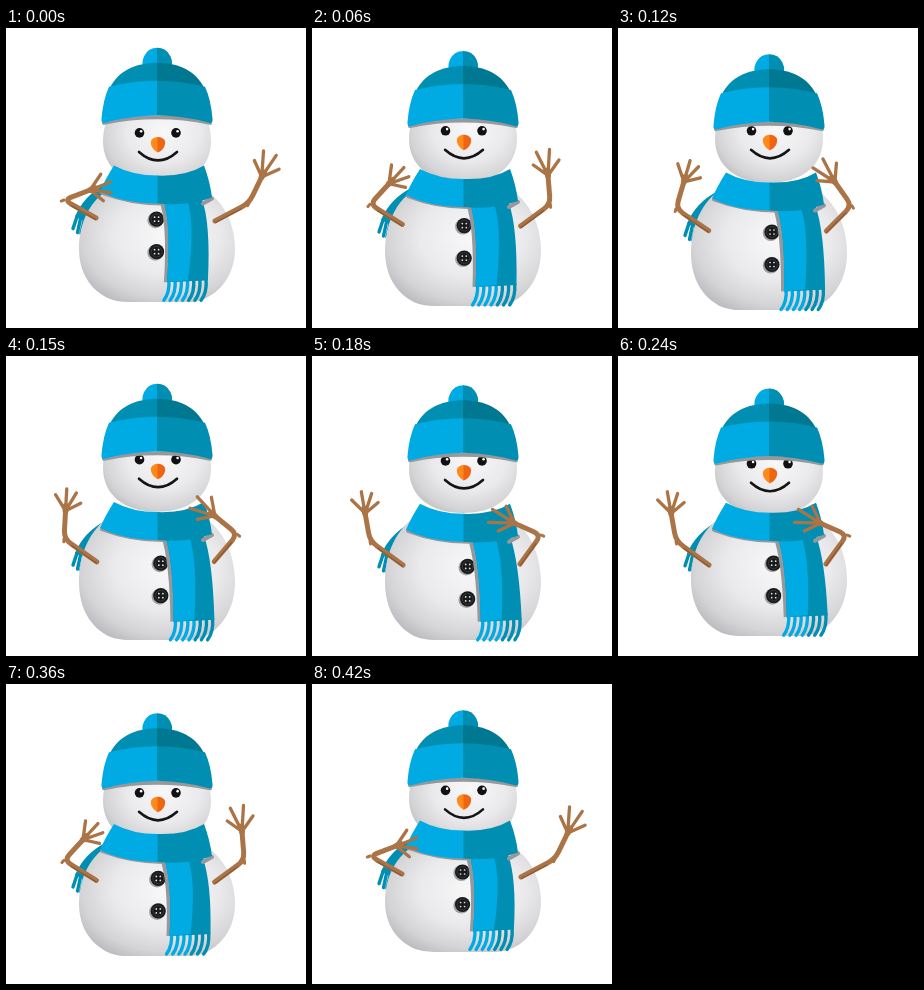
An HTML page for the animation above (0.45 s loop, 300x300 px).

```html
<!DOCTYPE html>
<html lang="en">
<head>
<meta charset="utf-8">
<title>Waving snowman</title>
<style>
html, body { margin: 0; width: 100%; height: 100%; overflow: hidden; background: #fff; }
svg { display: block; width: 100vw; height: 100vh; }
.light { fill: #00abe4; }
.mid { fill: #008fb2; }
.dark { fill: #007892; }
.twig { fill: none; stroke: #ab7447; stroke-linecap: round; stroke-linejoin: round; }
.grain { fill: none; stroke: #8a5935; stroke-width: 1.2; }
.shade { fill: none; stroke: #96989b; stroke-width: 4; stroke-linecap: round; }
.fringe { fill: none; stroke-width: 3.4; stroke-linecap: round; }
</style>
</head>
<body>
<svg viewBox="0 0 300 300">
  <defs>
    <radialGradient id="snow" cx=".56" cy=".42" r=".68">
      <stop offset="0" stop-color="#f8f8f9"/>
      <stop offset=".5" stop-color="#eaeaec"/>
      <stop offset=".8" stop-color="#d4d4d7"/>
      <stop offset="1" stop-color="#b8b8bc"/>
    </radialGradient>
    <g id="button">
      <circle cx="-1.2" cy="1" r="8" fill="#a2a2a5"/>
      <circle r="7.6" fill="#17191b"/>
      <circle r="5.4" fill="none" stroke="#3d3f42" stroke-width=".8"/>
      <path d="M-2-2h.1M2-2h.1M-2 2h.1M2 2h.1" stroke="#ddd" stroke-width="1.7" stroke-linecap="round"/>
    </g>
    <g id="eye">
      <circle r="4.8" fill="#111"/>
      <circle cx="1.6" cy="-1.7" r="1.3" fill="#fff"/>
    </g>
  </defs>

  <g id="back">
    <path class="mid" d="M99 163Q78 174 69 195L79 200Q86 186 102 178Z"/>
    <path class="fringe" stroke="#008fb2" d="M71 195l-4 12M74.500 197l-3 14M78 199l-3 13"/>
  </g>
  <path id="body" fill="url(#snow)" d="M105 160C84 172 73 196 73 223C73 247 84 266 104 275Q112 278 122 278H182Q192 278 200 274C218 265 229 246 229 223C229 196 217 172 196 160Z"/>
  <g id="buttons">
    <use href="#button"/>
    <use href="#button" y="32.5"/>
  </g>

  <g id="head">
    <path fill="url(#snow)" d="M97 114C97 141 118 158 151 158S205 141 205 114C205 82 182 66 151 66S97 82 97 114Z"/>
    <use href="#eye" x="133.500" y="106"/>
    <use href="#eye" x="170" y="106"/>
    <path d="M133 125Q152 142 171 125" fill="none" stroke="#151515" stroke-width="2.6" stroke-linecap="round"/>
    <path d="M152 125.500C148 124 144 119 145 114Q147 110 152 110Z" fill="#ff8a1c"/>
    <path d="M151.500 125.500C155 125 160 120 159 114Q157 110 151.500 110Z" fill="#ef6512"/>
  </g>

  <path id="tailShade" fill="#96989b"/>
  <path id="fringeLight" class="fringe" stroke="#00abe4"/>
  <path id="fringeMid" class="fringe" stroke="#008fb2"/>
  <path id="tail" class="mid"/>
  <path id="tailSide" class="light"/>
  <g id="wrap">
    <path class="shade" d="M96 171Q125 182 157 182M197 182L206 177"/>
    <path class="light" d="M108 144Q126 154 152 154V182Q118 182 94 170Q99 158 108 144Z"/>
    <path class="mid" d="M151.500 154Q180 155 198 144Q204 160 206 176Q182 185 151.500 182Z"/>
  </g>

  <g id="hat">
    <path class="shade" d="M98 101Q151 90 204 101"/>
    <path class="light" d="M151.500 26a15 15 0 0 0-12 24h12z"/>
    <path class="mid" d="M151 26a15 15 0 0 1 12 24h-12z"/>
    <path class="mid" d="M151.500 41C128 41 112 50 104 66H151.500Z"/>
    <path class="dark" d="M151 41C174 41 190 50 198 66H151Z"/>
    <path class="light" d="M103 65Q126 59 151.500 59V93.500Q124 94 99 101Q95 102 95.500 97Q97 78 103 65Z"/>
    <path class="mid" d="M151 59Q176 59 199 65Q205 78 206.500 97Q207 102 203 101Q178 94 151 93.500Z"/>
  </g>

  <g id="left"></g>
  <g id="right"></g>
</svg>
<script>
const STEP = 30, COUNT = 15;
const el = id => document.getElementById(id);
const mix = (a, b, u) => a + (b - a) * u;
const shift = (id, x, y) => el(id).setAttribute("transform", `translate(${x} ${y})`);
const setPath = (id, d) => el(id).setAttribute("d", d);

// Even rise to the peak at step `at`, then an even fall
const bounce = (k, peak, speed, at) => peak - speed * Math.abs(k - at);

// Limb poses: shoulder, elbow, forearm angle; fingers: angle, length
const limbs = {
  left: {
    from: [90, 190, 58, 172, -21], to: [91, 209, 58, 185, -100],
    fingers: [[-35, 19], [0, 22], [28, 21], [60, 17]], length: 28
  },
  right: {
    from: [209, 193, 243, 175, -64], to: [208, 208, 229, 179, -156],
    fingers: [[-50, 18], [-22, 26], [8, 26], [40, 19]], length: 29
  }
};

function polar(x, y, deg, r) {
  const a = deg * Math.PI / 180;
  return [x + r * Math.cos(a), y + r * Math.sin(a)];
}

function drawLimb(id, p) {
  const { from, to, fingers, length } = limbs[id];
  const [sx, sy, ex, ey, angle] = from.map((v, i) => mix(v, to[i], p));
  const wrist = polar(ex, ey, angle, length);
  const bendIn = [mix(ex, sx, .22), mix(ey, sy, .22)];
  const bendOut = polar(ex, ey, angle, 8);
  const twig = (d, w) => `<path class="twig" d="${d}" stroke-width="${w}"/>`;
  const tips = fingers.map(([a, r]) => `M${wrist}L${polar(...wrist, angle + a, r)}`).join("");
  el(id).innerHTML =
    twig(`M${sx} ${sy}L${bendIn}Q${ex} ${ey} ${bendOut}L${wrist}`, 5) +
    twig(`M${ex} ${ey}L${polar(ex, ey, angle + 180, 3)}`, 3) +
    twig(`M${wrist}L${polar(...wrist, angle, 5)}`, 6) +
    twig(tips, 3.3) +
    `<path class="grain" d="M${sx} ${sy + 1.7}L${bendIn[0]} ${bendIn[1] + 1.7}"/>`;
}

function drawTail(top, x, end) {
  const y = end - 21, bx = 165 + x, tx = 158 + x * .3;
  const strip = (a, b, c, d) =>
    `M${a} ${top}Q${a + 9} ${top + 25} ${c} ${y}L${d} ${y - 2}Q${b + 9} ${top + 25} ${b} ${top}Z`;
  setPath("tail", strip(tx, tx + 39, bx, bx + 41));
  setPath("tailSide", strip(tx, tx + 24, bx, bx + 21));
  setPath("tailShade", strip(tx - 4, tx + 35, bx - 3, bx + 38));
  const strands = (first, last) => {
    let d = "";
    for (let i = first; i <= last; i++) {
      const fx = bx + 2 + i * 6.2;
      d += `M${fx} ${y - 3}Q${fx + 1} ${y + 10} ${fx - 5} ${y + 18}`;
    }
    return d;
  };
  setPath("fringeLight", strands(0, 3));
  setPath("fringeMid", strands(4, 6));
}

function draw(k) {
  const wrapY = bounce(k, 5, 1.7, 6.7);
  shift("hat", 0, bounce(k, 8, 1.57, 9));
  shift("head", 0, 3.5 * Math.cos((k - 10.5) / COUNT * 2 * Math.PI));
  shift("wrap", 0, wrapY);
  shift("back", 0, wrapY);
  shift("buttons", bounce(k, 156.5, .85, 7), bounce(k, 212, 3.2, 6.5));
  const s = (bounce(k, 285, 2, 5.5) - 160) / 118;
  el("body").setAttribute("transform", `translate(0 ${160 * (1 - s)}) scale(1 ${s})`);
  drawTail(177 + wrapY, bounce(k, 5, 1.3, 7), bounce(k, 288, 2.3, 5.5));
  const swing = bounce(k, 7, 1, 7) / 6;
  drawLimb("left", swing);
  drawLimb("right", swing);
}

const start = performance.now();
let last = -1;
function tick(now) {
  const k = Math.floor(Math.max(0, now - start) / STEP) % COUNT;
  if (k !== last) draw(last = k);
  requestAnimationFrame(tick);
}
draw(0);
requestAnimationFrame(tick);
</script>
</body>
</html>
```
